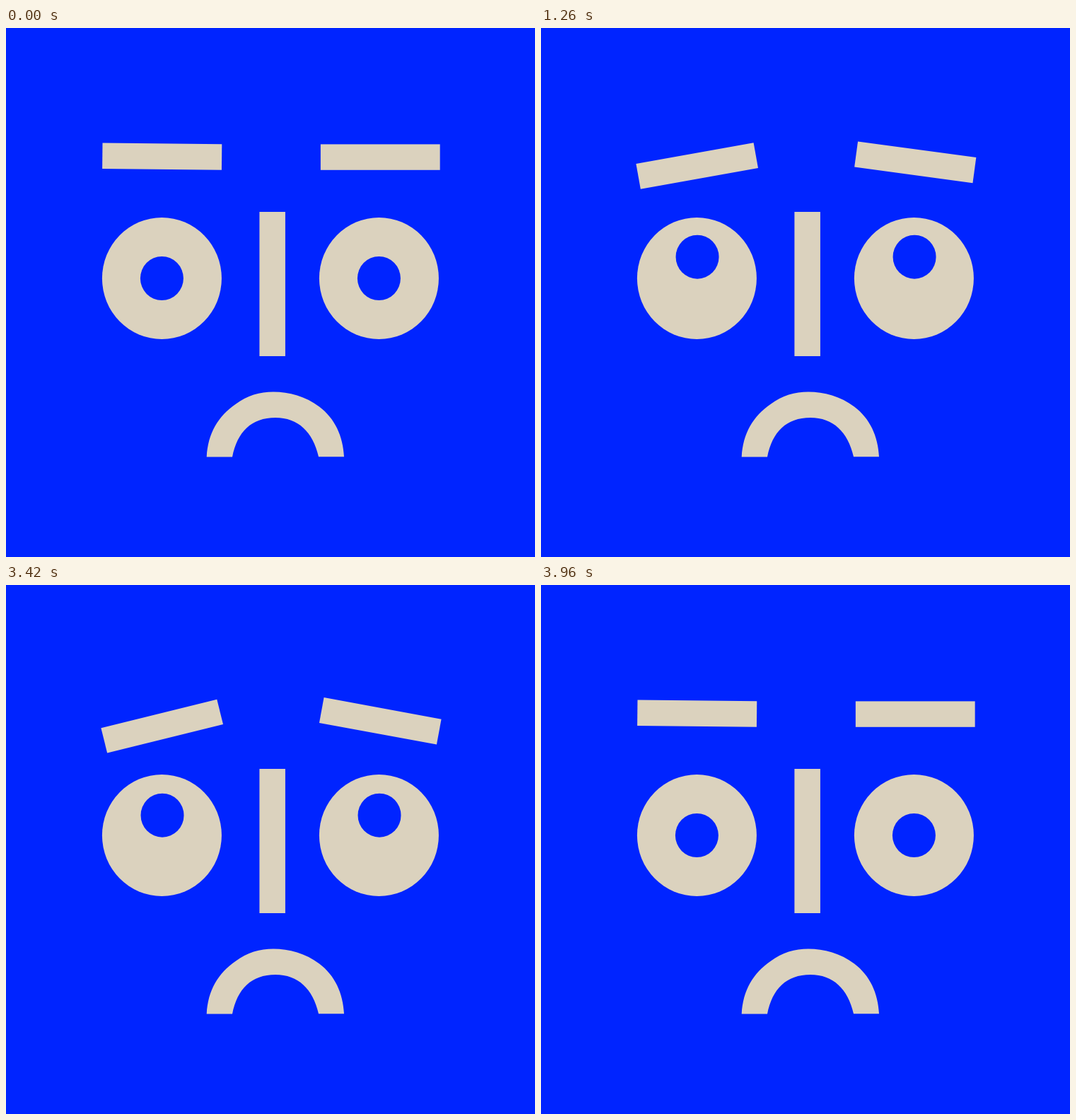
Recreate the animation shown at these times as an HTML page with a canvas. Size 748 by 748 pixels, loop 5.43 s.

```html
<!DOCTYPE html>
<html lang="en">
<head>
<meta charset="utf-8">
<title>Worried face</title>
<style>
  html, body { margin: 0; width: 100%; height: 100%; overflow: hidden; background: #0024ff; }
  canvas { display: block; width: 748px; height: 748px; }
</style>
</head>
<body>
<canvas id="stage" width="748" height="748"></canvas>
<script>
const ctx = document.getElementById("stage").getContext("2d");
const LOOP = 5430, STEP = 30;
const BLUE = "#0024ff", CREAM = "#dbd2be";

const mouth = new Path2D(
  "M283.7 606.5 C285.5 573 300 549 324.5 532 C341 519.5 359 514.5 378 514.5 " +
  "C400 514.5 424 521 443 535.5 C465 552 476.5 577 478 606.3 L442 606.3 " +
  "C434 571 413 551 381 551 C347 551 327 571 320 606.5 Z"
);

const mix = (a, b, k) => a + (b - a) * k;

function ease(t, start, duration) {
  const s = Math.min(1, Math.max(0, (t - start) / duration));
  return s * s * (3 - 2 * s);
}

function ellipse(x, y, rx, ry, color) {
  ctx.fillStyle = color;
  ctx.beginPath();
  ctx.ellipse(x, y, rx, ry, 0, 0, Math.PI * 2);
  ctx.fill();
}

function brow(x, y, degrees) {
  ctx.save();
  ctx.translate(x, y);
  ctx.rotate(degrees * Math.PI / 180);
  ctx.fillStyle = CREAM;
  ctx.fillRect(-84.4, -18.2, 168.8, 36.4);
  ctx.restore();
}

function eye(x, look) {
  ellipse(x, 354, 84.5, 86, CREAM);
  ellipse(x + 0.9 * look, mix(354, 313, look), 30.5, 31, BLUE);
}

function draw(t) {
  // Everything rises together; on the way back the brows follow the pupils late.
  const rise = ease(t, 930, 495);
  const look = rise - ease(t, 3100, 865);
  const worry = rise - ease(t, 3461, 495);

  ctx.fillStyle = BLUE;
  ctx.fillRect(0, 0, 748, 748);

  brow(220.7, mix(181.6, 199.6, worry), mix(0.58, -13.9, worry));
  brow(529.25, mix(182.6, 192.3, worry), mix(0, 10.45, worry));
  eye(220.4, look);
  eye(527.4, look);

  ctx.fillStyle = CREAM;
  ctx.fillRect(358.4, 260, 36.5, 204);
  ctx.fill(mouth);
}

const origin = performance.now();
function tick() {
  const t = (performance.now() - origin) % LOOP;
  draw(Math.floor(t / STEP) * STEP);
  requestAnimationFrame(tick);
}
tick();
</script>
</body>
</html>
```
